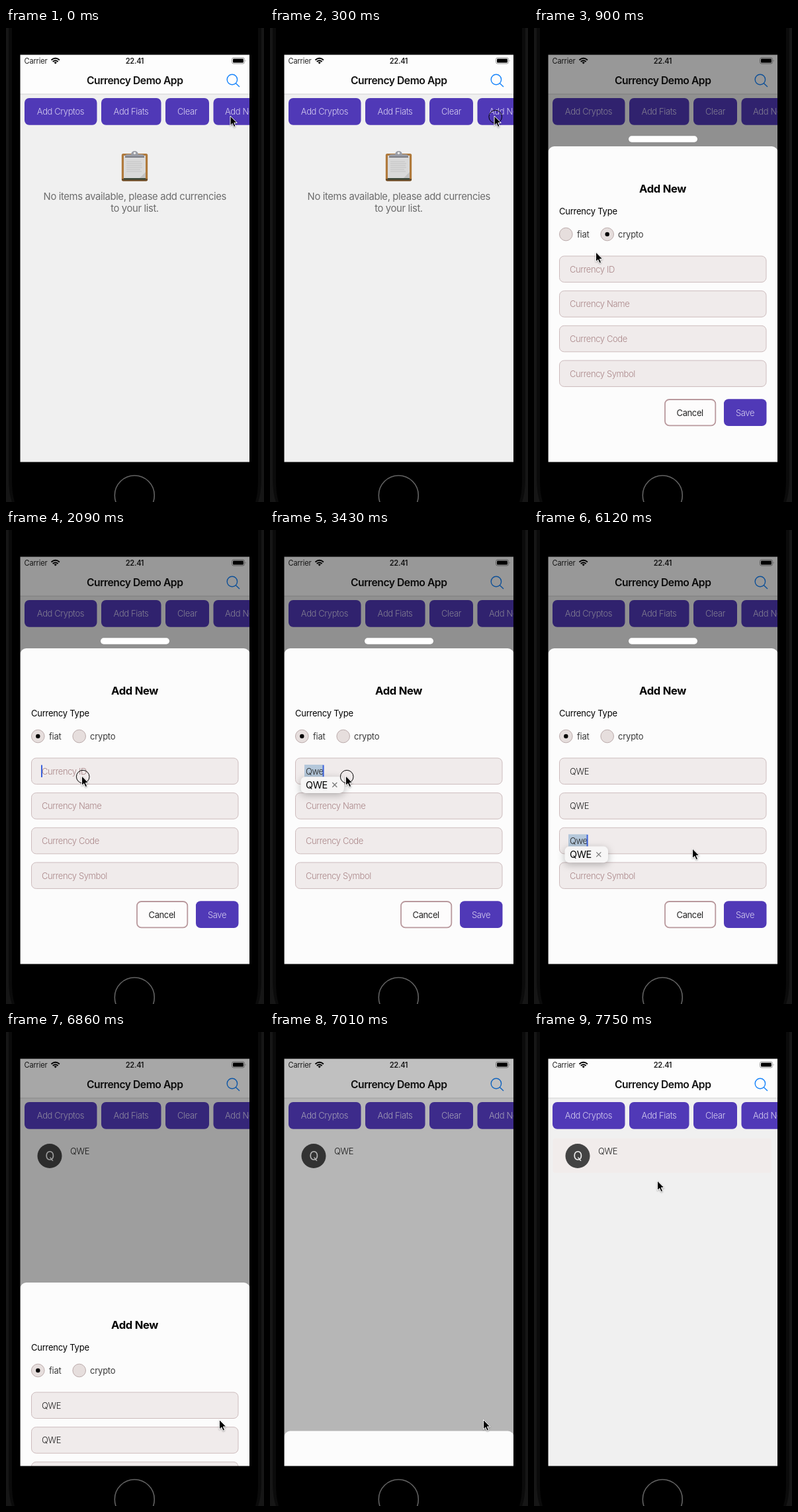
Animation, 390 px wide and 717 px high, one loop 8000 ms. Source, as an HTML page:

```html
<!DOCTYPE html>
<html lang="en">
<head>
<meta charset="utf-8">
<title>Currency Demo App</title>
<style>
  html, body { margin: 0; height: 100%; overflow: hidden; background: #000; }
  svg { display: block; }
  text { font: 400 13px Inter, Roboto, sans-serif; letter-spacing: -.03em; fill: #222; white-space: pre; }
  .mid { text-anchor: middle; }
  .light { font-weight: 300; }
  .loose { letter-spacing: -.018em; }
  .note { font-size: 14.8px; letter-spacing: -.024em; fill: #6c6c6c; }
  .btn { fill: #5039b7; }
  .btn + text { fill: #d5cdf0; font-weight: 300; }
  .field .box { fill: #f0ebeb; stroke: #cdbcbd; }
  .field .hint { fill: #aa8688; }
  .radio { fill: #e6dedd; stroke: #bbabab; }
  .radio + text { fill: #3a3a3a; }
  #popup { filter: drop-shadow(0 3px 6px #0004); }
</style>
</head>
<body>
<svg width="390" height="717" viewBox="0 0 390 717">
  <rect width="390" height="717" fill="#161616"/>
  <path d="M4 0V680Q4 704 9 717H381Q386 704 386 680V0Z" fill="#0b0b0b"/>
  <path d="M9 0V685Q9 704 13 717H377Q381 704 381 685V0Z"/>
  <circle cx="194.3" cy="707" r="30" fill="#000" stroke="#636363" stroke-width="1.6"/>

  <svg x="21" y="40" width="347" height="617" viewBox="21 40 347 617">
    <rect x="21" y="40" width="348" height="618" fill="#f0f0f0"/>
    <rect x="21" y="40" width="348" height="60" fill="#fdfdfd"/>
    <rect x="21" y="99.5" width="348" height="1" fill="#d2d2d2"/>
    <text class="loose" x="27.5" y="54" style="font-size:11.1px">Carrier</text>
    <g fill="none" stroke="#000" stroke-width="2">
      <path d="M68.5 48.6Q74.7 43 80.9 48.6M70.8 51Q74.7 47.6 78.6 51"/>
      <path d="M72.6 52.2Q74.7 50.5 76.8 52.2L74.7 54.6Z" fill="#000" stroke="none"/>
    </g>
    <text class="mid" x="194.5" y="54" style="font-size:11.1px;font-weight:600">22.41</text>
    <rect x="341.5" y="45" width="19" height="9" rx="2.5" fill="none" stroke="#999"/>
    <rect x="343" y="46.4" width="16" height="6.2" rx="1.3"/>
    <path d="M361.8 48v3q1.6-1.5 0-3" fill="#888"/>
    <text class="mid" x="194.7" y="85" style="font-size:15.7px;font-weight:600;fill:#111">Currency Demo App</text>
    <path d="M347.5 83.8L353 89M349.6 78a7.7 7.7 0 1 1-15.4 0a7.7 7.7 0 1 1 15.4 0" fill="none" stroke="#1583fb" stroke-width="1.4"/>

    <rect class="btn" x="28" y="106" width="109.5" height="40.7" rx="7"/><text class="mid" x="82.5" y="131">Add Cryptos</text>
    <rect class="btn" x="144" y="106" width="90.5" height="40.7" rx="7"/><text class="mid" x="189" y="131">Add Fiats</text>
    <rect class="btn" x="241" y="106" width="66" height="40.7" rx="7"/><text class="mid" x="274" y="131">Clear</text>
    <rect class="btn" x="313.5" y="106" width="90" height="40.7" rx="7"/><text x="331" y="131">Add New</text>

    <g id="empty">
      <rect x="174.8" y="190" width="39.4" height="41.5" rx="2.5" fill="#b07a3c"/>
      <path d="M175 228h39v1.5q0 2-2 2h-35q-2 0-2-2z" fill="#6b4a26"/>
      <rect x="178" y="193" width="33" height="34" fill="#d9d9d9"/>
      <path d="M211 218v9h-9z" fill="#c2c2c2"/>
      <path d="M178 227h33v2.5h-33z" fill="#3f4a3c"/>
      <path d="M182 202h22M182 205h24M182 208h23M182 211h24M182 214h21M182 217h23" stroke="#bdbdbd" stroke-width=".8"/>
      <path d="M180 196v-2q0-3 4-3h5q1-5 5.5-5t5.5 5h5q4 0 4 3v2z" fill="#9a9ca4"/>
      <path d="M180 194.5h29v1.5h-29z" fill="#6f7178"/>
      <circle cx="194.5" cy="189.3" r="1.7" fill="#eee"/>
      <text class="mid note" x="194.8" y="260">No items available, please add currencies</text>
      <text class="mid note" x="194.5" y="277.7">to your list.</text>
    </g>

    <g id="row">
      <rect id="card" x="28.5" y="161" width="330.5" height="52" rx="3" fill="#f1eceb"/>
      <circle cx="66" cy="187.5" r="18.5" fill="#434343"/>
      <text class="mid" x="66" y="194" style="font-size:18.5px;fill:#eee">Q</text>
      <text class="light" x="97" y="185">QWE</text>
    </g>

    <rect id="dim" x="21" y="40" width="348" height="618"/>

    <g id="sheet">
      <rect id="handle" x="143" y="163.3" width="104" height="9.4" rx="4.7" fill="#fff"/>
      <rect x="21.5" y="179" width="347" height="500" rx="9" fill="#fcfcfc"/>
      <text class="mid loose" x="194.6" y="249" style="font-size:16.6px;font-weight:700;fill:#000">Add New</text>
      <text class="loose" x="38" y="282" style="fill:#000">Currency Type</text>
      <circle class="radio" cx="48.3" cy="312" r="9.8"/><text class="loose" x="65" y="316.7">fiat</text>
      <circle class="radio" cx="110.7" cy="312" r="9.8"/><text class="loose" x="127" y="316.7">crypto</text>
      <circle id="dot" cy="312" r="3.2"/>
      <g id="fields"></g>
      <rect x="198" y="562" width="76.3" height="39.3" rx="6.5" fill="#fdfcfc" stroke="#b9999d" stroke-width="1.8"/>
      <text class="mid" x="235.7" y="586.5">Cancel</text>
      <rect class="btn" x="287" y="561.3" width="64.5" height="40.7" rx="7"/><text class="mid" x="319" y="586.5">Save</text>
    </g>
    <rect x="21" y="40" width="347.5" height="617" fill="none" stroke="#000"/>
  </svg>

  <g id="cursor">
    <circle id="press" cx="1.7" cy="1.2" r="9.8" fill="none" stroke="#000"/>
    <path d="M0 0V14.5L3.3 11.5L5.6 16.7L8.1 15.6L5.8 10.5H10.3Z" stroke="#fff" style="filter:drop-shadow(0 1px 1px #0005)"/>
  </g>
</svg>

<script>
const LOOP = 8000, TICK = 149, LAST_TICK = 52, FIELD_STEP = 52.65;
const $ = id => document.getElementById(id);
const show = (el, on) => { el.style.visibility = on ? 'visible' : 'hidden'; };
const within = (t, from, to) => t >= from && t < to;

// Key rows are [tick, ...values]
const cursorKeys = [
  [0, 339, 133], [2, 339, 133], [6, 93.5, 339], [8, 64.5, 312.5], [10, 64.5, 312.5],
  [12, 96, 461], [14, 114.5, 372], [25, 114.5, 372], [27, 144.5, 416], [32, 144.5, 416],
  [34, 245.5, 489], [37, 245.5, 489], [38, 239.5, 482], [41, 239.5, 482],
  [43, 322.5, 586.5], [50, 322.5, 586.5], [52, 186.5, 225]
];
const sheetKeys = [[2, 478], [3, 290], [4, 75], [5, 12], [6, 0], [45, 0], [46, 200], [47, 424.5], [48, 490]];
const dimKeys = [[2, 0], [4, .35], [5, .4], [45, .4], [46, .34], [47, .245], [48, .09], [49, 0]];
const cardKeys = [[50, 0], [52, 1]];
const presses = [[1, 3], [9, 10], [14, 15], [23, 25], [27, 28], [34, 36], [43, 45]];

// Ticks at which each field is focused, typed into, corrected and left
const fields = [
  { label: 'ID', focus: 14, type: 17, suggest: 21, caps: 24, done: 25 },
  { label: 'Name', focus: 28, type: 30, suggest: 33, caps: 34, done: 36 },
  { label: 'Code', focus: 36, type: 37, suggest: 41, caps: 44, done: 45 },
  { label: 'Symbol', focus: 99, type: 99, suggest: 99, caps: 99, done: 99 }
];

$('fields').innerHTML = fields.map((f, i) => `
  <g class="field" transform="translate(0 ${i * FIELD_STEP})">
    <rect class="box" x="38.5" y="345" width="312.5" height="39.5" rx="7"/>
    <rect class="selection" x="52" y="355" height="19" fill="#b4c7da"/>
    <text class="value light" x="54" y="369.7"></text>
    <rect class="caret" y="355.5" width="2" height="18.5" fill="#3c62dc"/>
  </g>`).join('') + `
  <g id="popup">
    <rect x="46.5" y="373.3" width="65.5" height="24.7" rx="7" fill="#f7f6f6"/>
    <text x="54" y="390.7" style="font-size:14.5px;fill:#000">QWE</text>
    <path d="M94.3 382l7 7m0-7l-7 7" stroke="#777" stroke-width="1.2"/>
  </g>`;
const fieldNodes = [...document.querySelectorAll('.field')];

function track(keys, t) {
  const next = keys.findIndex(k => k[0] > t);
  if (next === 0) return keys[0].slice(1);
  if (next < 0) return keys[keys.length - 1].slice(1);
  const a = keys[next - 1], b = keys[next];
  const p = (t - a[0]) / (b[0] - a[0]);
  return a.slice(1).map((v, i) => v + (b[i + 1] - v) * p);
}

function drawField(f, node, t) {
  const text = node.querySelector('.value');
  const selection = node.querySelector('.selection');
  const caret = node.querySelector('.caret');
  const typed = t >= f.type;
  const word = 'Qwe'.slice(0, Math.max(0, t - f.type + 1));
  text.textContent = typed ? (t >= f.caps ? word.toUpperCase() : word) : 'Currency ' + f.label;
  text.classList.toggle('hint', !typed);
  const width = typed ? text.getComputedTextLength() : 0;
  selection.setAttribute('width', width + 1.5);
  caret.setAttribute('x', 53 + width);
  show(caret, within(t, f.focus, f.done));
  show(selection, within(t, f.suggest, f.done));
}

function draw(t) {
  $('sheet').setAttribute('transform', `translate(0 ${track(sheetKeys, t)})`);
  $('dim').setAttribute('opacity', track(dimKeys, t)[0]);
  $('card').setAttribute('opacity', track(cardKeys, t)[0]);
  $('dot').setAttribute('cx', t < 10 ? 110.7 : 48.3);
  show($('handle'), within(t, 3, 46));
  show($('empty'), t < 45);
  show($('row'), t >= 45);

  fields.forEach((f, i) => drawField(f, fieldNodes[i], t));
  const active = fields.findIndex(f => within(t, f.suggest, f.done));
  show($('popup'), active >= 0);
  $('popup').setAttribute('transform', `translate(0 ${active * FIELD_STEP})`);

  $('cursor').setAttribute('transform', `translate(${track(cursorKeys, t)})`);
  show($('press'), presses.some(([from, to]) => within(t, from, to)));
}

function loop() {
  draw(Math.min(LAST_TICK, Math.floor(performance.now() % LOOP / TICK)));
  requestAnimationFrame(loop);
}
loop();
</script>
</body>
</html>
```
